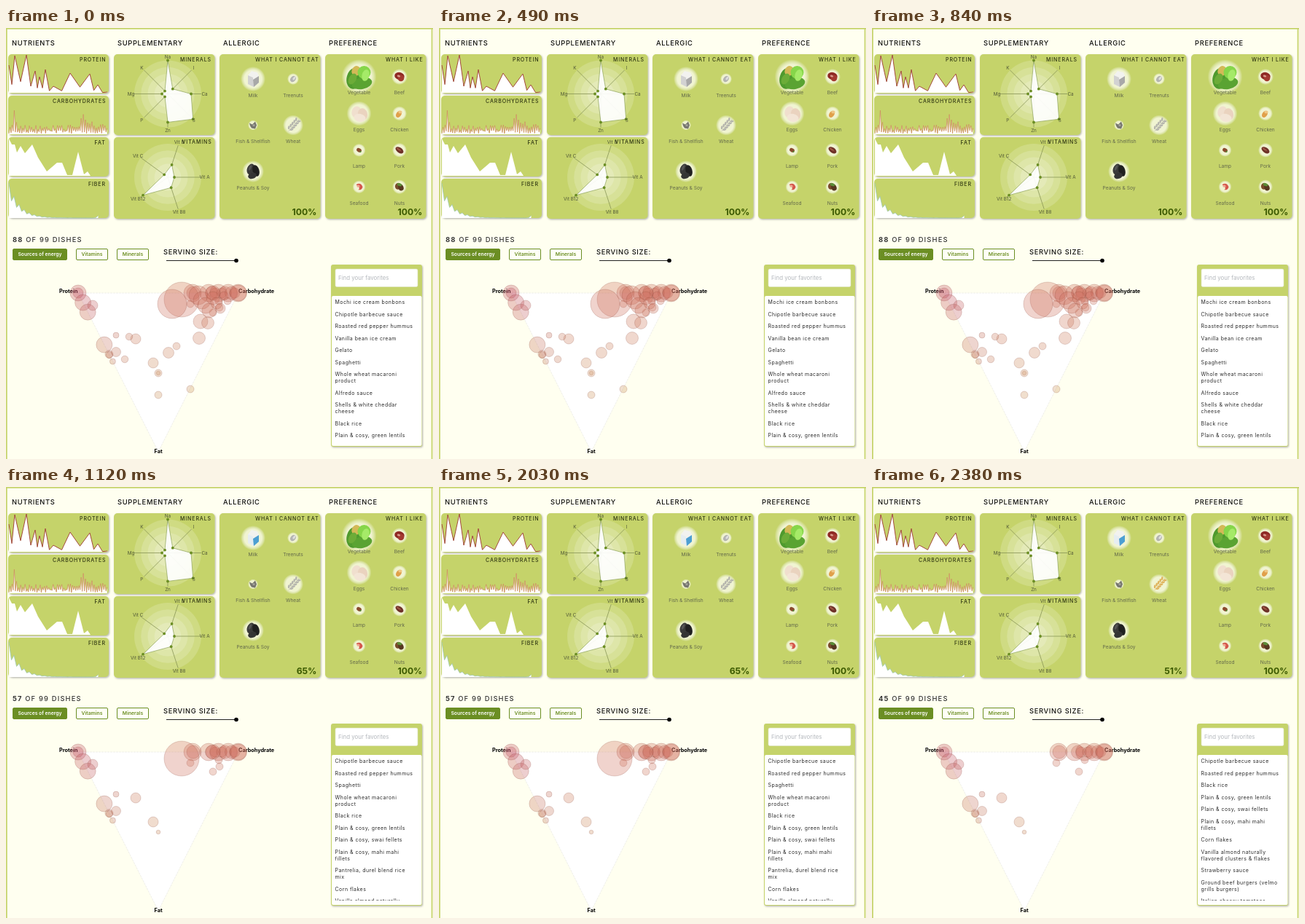
Animation, 586 px wide and 592 px high, one loop 2.45 s. Source, as an HTML page:

```html
<!DOCTYPE html>
<html lang="en">
<head>
<meta charset="utf-8">
<title>Dish explorer</title>
<style>
html, body { margin: 0; width: 100%; height: 100%; overflow: hidden; background: #fffff0; }
svg { display: block; width: 586px; height: 592px; font-family: Inter, "Open Sans", sans-serif; }
.head { font-size: 9.3px; font-weight: 500; letter-spacing: .7px; fill: #111; }
.cap { font-size: 7px; font-weight: 500; letter-spacing: .9px; fill: #2c3310; }
.food { font-size: 6.6px; fill: #62684a; text-anchor: middle; }
.axis { font-size: 6.3px; fill: #4f5636; text-anchor: middle; }
.pct { font-size: 12.2px; font-weight: 700; fill: #3c5a00; text-anchor: end; }
.count { font-size: 9.3px; font-weight: 500; letter-spacing: 1.2px; fill: #333; }
.btn { font-size: 6.8px; font-weight: 600; text-anchor: middle; }
.corner { font-size: 7.3px; font-weight: 700; fill: #000; }
.hint { font-size: 7.9px; fill: #b4b8bd; }
.dish { font-size: 7px; letter-spacing: .45px; fill: #2a2a2a; }
</style>
</head>
<body>
<svg id="stage" viewBox="0 0 586 592" width="586" height="592"></svg>
<script>
const LOOP = 2450, MILK_OFF = 980, WHEAT_OFF = 2170;
const GREEN = '#c5d36b', OLIVE = '#6b8e23';
const stage = document.getElementById('stage');

const text = (cls, x, y, s, extra = '') => `<text class="${cls}" x="${x}" y="${y}" ${extra}>${s}</text>`;
const rect = (x, y, w, h, r, fill, extra = '') =>
  `<rect x="${x}" y="${y}" width="${w}" height="${h}" rx="${r}" fill="${fill}" ${extra}/>`;
const circle = (x, y, r, fill, extra = '') => `<circle cx="${x}" cy="${y}" r="${r}" fill="${fill}" ${extra}/>`;
const oval = (x, y, a, b, fill, turn = 0) =>
  `<ellipse rx="${a}" ry="${b}" fill="${fill}" transform="translate(${x} ${y}) rotate(${turn})"/>`;
const path = (d, fill, extra = '') => `<path d="${d}" fill="${fill}" ${extra}/>`;
const line = (x1, y1, x2, y2, color, w) => path(`M${x1} ${y1}L${x2} ${y2}`, 'none', `stroke="${color}" stroke-width="${w}"`);
const panel = (x, y, w, h) => rect(x, y, w, h, 5, GREEN, 'filter="url(#drop)"');
const group = (id, body) => `<g id="${id}">${body}</g>`;
const times = (n, fn) => Array.from({ length: n }, (_, i) => fn(i));

function random(seed) {
  return () => (seed = seed * 16807 % 2147483647) / 2147483647;
}

const defs = `<defs>
  <filter id="drop" x="-10%" y="-15%" width="125%" height="135%">
    <feDropShadow dx="1" dy="1.2" stdDeviation="1.1" flood-color="#666" flood-opacity=".5"/></filter>
  <radialGradient id="halo"><stop offset=".7" stop-color="#fffff4" stop-opacity=".75"/>
    <stop offset=".86" stop-color="#fff" stop-opacity=".4"/>
    <stop offset="1" stop-color="#fff" stop-opacity="0"/></radialGradient>
  <clipPath id="listBox"><rect x="447" y="368" width="124" height="200"/></clipPath>
</defs>`;

// Points are [x, height above the base line]
function chart(points, base, color, width) {
  const d = points.map(([x, h]) => `${x} ${base - h}`).join('L');
  return path(`M4 ${base}L${d}L${points[points.length - 1][0]} ${base}Z`, '#fff') +
    (color ? path('M' + d, 'none', `stroke="${color}" stroke-width="${width}"`) : '');
}

// Peaks joined by valleys halfway between neighbours
const ridge = peaks => peaks.flatMap(([x, h], i) => {
  const next = peaks[i + 1];
  return next ? [[x, h], [(x + next[0]) / 2, Math.min(h, next[1]) * .3]] : [[x, h]];
});

function nutrients() {
  const rnd = random(11);
  const bump = (x, mid, spread) => Math.exp(-(((x - mid) / spread) ** 2));
  const protein = ridge([[4, 38], [12, 51], [28, 52], [40, 30], [46, 22], [54, 32], [65, 9], [88, 27], [115, 26], [126, 11], [139, 1]]);
  const carbs = times(92, i => {
    const x = 4 + i * 1.48, top = 14 + 40 * bump(x, 11, 3) + 28 * bump(x, 111, 7);
    return [x, i % 2 ? top * (.35 + .65 * rnd()) : 1 + 4 * rnd()];
  });
  const fat = [[4, 51], [8, 43], [12, 43], [15, 32], [20, 41], [26, 31], [36, 43], [44, 25], [56, 6], [70, 18], [77, 18], [84, 1], [91, 1], [99, 33], [107, 2], [112, 6], [116, 0]];
  const fiber = times(36, i => {
    const x = 4 + i * 3.5;
    return [x, 48 * Math.exp(-i / 4.2) * (i % 2 ? .62 : 1) + 3.5 * bump(x, 126, 2)];
  });
  const caps = [[101, 'PROTEIN'], [64, 'CARBOHYDRATES'], [121.5, 'FAT'], [113, 'FIBER']];
  return caps.map((_, i) => panel(3, 36 + i * 57, 138, 54)).join('') +
    chart(protein, 89, '#a34a3c', 1) + chart(carbs, 146, '#cd8f5f', .8) +
    chart(fat, 203) + chart(fiber, 261, '#9cc7ae', .8) +
    caps.map(([x, s], i) => text('cap', x, 45.5 + i * 57, s)).join('');
}

function radar(cx, cy, tilt, labels, values) {
  const at = (i, r) => {
    const a = tilt + i * 2 * Math.PI / values.length;
    return [cx + r * Math.sin(a), cy - r * Math.cos(a)];
  };
  const dots = values.map((v, i) => at(i, v));
  return times(5, i => circle(cx, cy, 46 - i * 9.2, '#fff', 'fill-opacity=".17"')).join('') +
    values.map((_, i) => line(cx, cy, ...at(i, 46), '#7d8a4c', .7)).join('') +
    path(`M${dots.join('L')}Z`, '#fff', 'fill-opacity=".92" stroke="#8da35a" stroke-width=".7"') +
    dots.map(([x, y]) => circle(x, y, 1.9, OLIVE)).join('') +
    labels.map((s, i) => { const [x, y] = at(i, 50.5); return text('axis', x, y + 2.3, s); }).join('');
}

function supplements() {
  return panel(148, 36, 138.5, 111) + panel(148, 150, 138.5, 112) +
    radar(222, 90.5, 0, ['Na', 'I', 'Ca', 'S', 'Zn', 'P', 'Mg', 'K'], [46, 9.6, 32, 49, 39, 5.6, 8, 5.6]) +
    radar(222, 205, Math.PI / 10, ['Vit B', 'Vit A', 'Vit B8', 'Vit B12', 'Vit C'], [18, 9, 15, 42, 6]) +
    text('cap', 239, 45.5, 'MINERALS') + text('cap', 241.5, 158.5, 'VITAMINS');
}

// Icons are drawn around their own centre
const food = (x, y, r, name, labelY, art) =>
  `<g transform="translate(${x} ${y})">${circle(0, 0, r, 'url(#halo)')}${art}</g>` + text('food', x, labelY + 2.4, name);

const carton = (left, right) =>
  path('M-7 -5L-2 -11L6 -9L8 -5L8 5L1 11L-7 7Z', '#f2f2ef') +
  path('M-7 -5L0 -2L1 11L-7 7Z', left) + path('M0 1L8 -4L8 5L1 11Z', right);

const wheat = color => line(-6, 8, 8, -8, color, .9) + times(5, i => {
  const x = i * 2.5 - 4, y = 5 - i * 2.8;
  return oval(x - 1.8, y - 1.7, 1.3, 2.5, color, 8) + oval(x + 2, y + 1, 1.3, 2.5, color, 78);
}).join('');

function allergies() {
  const row = i => 70 + i * 63.5, label = i => 92.5 + i * 63.5;
  const nut = oval(0, 0, 3.4, 4.5, '#b4b4b2', 40) + oval(1.5, -1, 1.4, 2.8, '#dededc', 40);
  const fish = path('M-5 -3L-1 -1L3 -5L5 0L3 5L-2 4L-4 1Z', '#77776f') + circle(1, 0, 1.6, '#a3a39c');
  const peanuts = oval(-3, -3, 5.2, 7.6, '#3a3a39', 20) + oval(4, -1, 4.5, 8, '#202020', -15) +
    oval(-1, 6, 6, 4, '#343434', -18) + oval(-4, -5, 1.6, 4, '#555', 25);
  return panel(293, 36, 138.5, 226) + text('cap', 342, 45.5, 'WHAT I CANNOT EAT') +
    food(339, row(0), 17, 'Milk', label(0),
      group('milkGray', carton('#d2d2d2', '#a8a8a8')) + group('milkColor', carton('#e6edf1', '#4d9fd2'))) +
    food(394, row(0), 8, 'Treenuts', label(0), nut) +
    food(339, row(1), 7, 'Fish &amp; Shellfish', label(1), fish) +
    food(394, row(1), 14, 'Wheat', label(1), group('wheatGray', wheat('#b5b5ad')) + group('wheatColor', wheat('#dfb45e'))) +
    food(339, row(2), 15, 'Peanuts &amp; Soy', label(2), peanuts) +
    text('pct', 426.5, 257, '', 'id="share"');
}

function likes() {
  const greens = oval(-6, 2, 11, 15, '#4f9a2e', 15) + oval(4, 9, 14, 8, '#5aa332', -12) + oval(-4, -8, 6, 7, '#d3b957', 20) +
    oval(7, -6, 9, 9, '#86d64a') + oval(9, -2, 5, 8, '#a5ea68', 15) + oval(-9, 3, 5, 8, '#6cac38', 30);
  const beef = oval(0, -1, 6.8, 5.2, '#8f2a25', 12) + oval(2, 2, 4.4, 4.2, '#a33a30') + oval(-1, -1, 2.2, 1.4, '#d99a8c', 15);
  const eggs = oval(-3.5, -2, 6.5, 8, '#f0dfce', 15) + oval(5, 1, 6.5, 8.3, '#ead3bf', -15) + oval(1, 6, 8, 5.5, '#f3e5d6', 10);
  const chicken = oval(-1, 1, 3.4, 5, '#e0a04a', 35) + oval(1, -2, 2.6, 2, '#efc684');
  const lamb = oval(0, 0, 3.5, 2.6, '#8a4a2c', 25) + circle(2, 2, 1.1, '#4c8a2d');
  const pork = oval(0, 0, 6.2, 3.6, '#6f3228', 35) + oval(-1, -1, 3.6, 1, '#a35a48', 35);
  const sea = path('M-4 -3Q2 -7 5 0Q4 5 -1 4Q3 1 -4 -3Z', '#d4574c') + oval(-1, -1, 2, 1.6, '#f0a690');
  const nuts = oval(-2, -1, 4, 4.6, '#7a4b2b', 20) + oval(2, 1, 3.6, 4.4, '#573720', -20) + oval(0, -3, 3.4, 2, '#5c8d37', 20);
  const left = [['Vegetable', 24, greens], ['Eggs', 17, eggs], ['Lamp', 9, lamb], ['Seafood', 9, sea]];
  const right = [['Beef', 11, beef], ['Chicken', 10, chicken], ['Pork', 10, pork], ['Nuts', 10, nuts]];
  const column = (x, items) => items.map(([name, r, art], i) => food(x, 67 + i * 50.4, r, name, 89 + i * 50.4, art)).join('');
  return panel(438, 36, 138.5, 226) + text('cap', 521, 45.5, 'WHAT I LIKE') +
    column(484.5, left) + column(540, right) + text('pct', 571.5, 257, '100%');
}

// Tint runs from crimson (left) to salmon (right) to tan (bottom)
function bubble([x, y, r]) {
  const p = Math.max(0, 1 - (x - 95) / 90), f = Math.min(1, Math.max(0, (y - 365) / 130));
  const tint = `rgb(${205 - 12 * p},${106 - 26 * p + 44 * f},${90 + 8 * p + 4 * f})`;
  return circle(x, y, r, tint, 'fill-opacity=".3" stroke="#8a4a3c" stroke-opacity=".32" stroke-width=".7"');
}
const bubbles = (...sets) => sets.flat().map(bubble).join('');

function ternary() {
  // Dishes without carbohydrate lie on the left edge, those without fat on the top edge
  const leftEdge = [[0, 11], [0, 7], [.06, 11], [.12, 11], [.326, 11], [.386, 5.5], [.39, 4.5], [.431, 4]]
    .map(([f, r]) => [99 + 110 * f, 364 + 218 * f, r]);
  const topEdge = times(10, i => [278 + i * 4.5, 364, i % 3 ? 7 + i % 2 * 2 : 12]);
  const sparse = [[119, 381, 7], [151, 422, 4], [151, 445, 6.5], [178, 427, 7], [202, 460, 7], [209, 474, 2.8],
    [256, 364, 12], [257, 364, 9], [253, 379, 5], [284, 391, 5], [292, 375, 5], [319, 364, 11]];
  const wheatOnly = [[241, 373, 24], [293, 384, 5], [284, 364, 10]];
  const milkOnly = [[228, 379, 20], [267, 403, 10], [277, 405, 8.5], [265, 426, 8.5], [234, 437, 5], [223, 446, 7.5],
    [209, 474, 5], [209, 504, 5], [253, 496, 5], [169, 424, 4.8], [163, 455, 4.8]];
  const milkCloud = times(9, i => [264 + i * 5, 367 + i * 7 % 24, 13 - i]);
  return path('M99 364H319L209 582Z', '#fff', 'stroke="#e9e9e2" stroke-width=".7" stroke-dasharray="3 1"') +
    text('corner', 73, 364.3, 'Protein') + text('corner', 319, 364.3, 'Carbohydrate') + text('corner', 203.5, 584.2, 'Fat') +
    bubbles(leftEdge, topEdge, sparse) + group('wheatDots', bubbles(wheatOnly)) +
    group('milkDots', bubbles(milkOnly, milkCloud));
}

function controls() {
  const button = (x, w, label, on) =>
    rect(x + .5, 303.5, w - 1, 15, 1.5, on ? OLIVE : '#fffff6', `stroke="${OLIVE}"`) +
    text('btn', x + w / 2, 313.4, label, `fill="${on ? '#fff' : OLIVE}"`);
  return `<text class="count" x="9" y="294.3"><tspan id="count" font-weight="700"></tspan> OF 99 DISHES</text>` +
    button(9, 75, 'Sources of energy', true) + button(96, 44, 'Vitamins') + button(152, 44, 'Minerals') +
    text('head', 216, 311.3, 'SERVING SIZE:') + line(220, 319.5, 316, 319.5, '#222', 1) + circle(316, 319.5, 2.8, '#000');
}

const macaroni = 'Whole wheat macaroni|product', lentils = 'Plain &amp; cosy, green lentils',
  swai = 'Plain &amp; cosy, swai fellets', mahi = 'Plain &amp; cosy, mahi mahi|fillets',
  chipotle = 'Chipotle barbecue sauce', hummus = 'Roasted red pepper hummus',
  vanilla = 'Vanilla almond naturally|flavored clusters &amp; flakes';
const lists = [
  ['Mochi ice cream bonbons', chipotle, hummus, 'Vanilla bean ice cream', 'Gelato', 'Spaghetti', macaroni,
    'Alfredo sauce', 'Shells &amp; white cheddar|cheese', 'Black rice', lentils],
  [chipotle, hummus, 'Spaghetti', macaroni, 'Black rice', lentils, swai, mahi,
    'Pantrelia, durel blend rice|mix', 'Corn flakes', vanilla],
  [chipotle, hummus, 'Black rice', lentils, swai, mahi, 'Corn flakes', vanilla, 'Strawberry sauce',
    'Ground beef burgers (velmo|grills burgers)', 'Italian cheesy tomatoes']];

function dishes(items) {
  let y = 379, s = '';
  for (const item of items) {
    item.split('|').forEach((part, i) => { if (i) y += 9; s += text('dish', 451.5, y, part); });
    y += 16.5;
  }
  return s;
}

function search() {
  return rect(446, 325, 125, 250, 3, GREEN, 'filter="url(#drop)"') + rect(447, 368, 123.5, 206, 2, '#fff') +
    rect(452, 331, 113, 24.5, 2, '#fff', 'stroke="#dde2c4" stroke-width=".6"') + text('hint', 456, 346, 'Find your favorites') +
    `<g clip-path="url(#listBox)">${lists.map((l, i) => group('list' + i, dishes(l))).join('')}</g>`;
}

const headings = ['NUTRIENTS', 'SUPPLEMENTARY', 'ALLERGIC', 'PREFERENCE'];
stage.innerHTML = defs + rect(0, 0, 586, 592, 0, '#fffff0') +
  rect(0, 0, 586, 1.7, 0, GREEN) + rect(0, 0, 1.7, 592, 0, GREEN) + rect(583.7, 0, 1.7, 592, 0, GREEN) +
  headings.map((s, i) => text('head', 8 + i * 145, 24.3, s)).join('') +
  nutrients() + supplements() + allergies() + likes() + controls() + ternary() + search();

const el = id => document.getElementById(id);
const show = (id, on) => el(id).setAttribute('display', on ? 'inline' : 'none');
let current = -1;

function render(t) {
  const step = t < MILK_OFF ? 0 : t < WHEAT_OFF ? 1 : 2;
  if (step === current) return;
  current = step;
  el('count').textContent = [88, 57, 45][step];
  el('share').textContent = ['100%', '65%', '51%'][step];
  show('milkGray', step < 1);
  show('milkColor', step >= 1);
  show('wheatGray', step < 2);
  show('wheatColor', step >= 2);
  show('milkDots', step < 1);
  show('wheatDots', step < 2);
  lists.forEach((_, i) => show('list' + i, i === step));
}

const start = performance.now();
function tick() {
  render((performance.now() - start) % LOOP);
  requestAnimationFrame(tick);
}
tick();
</script>
</body>
</html>
```
